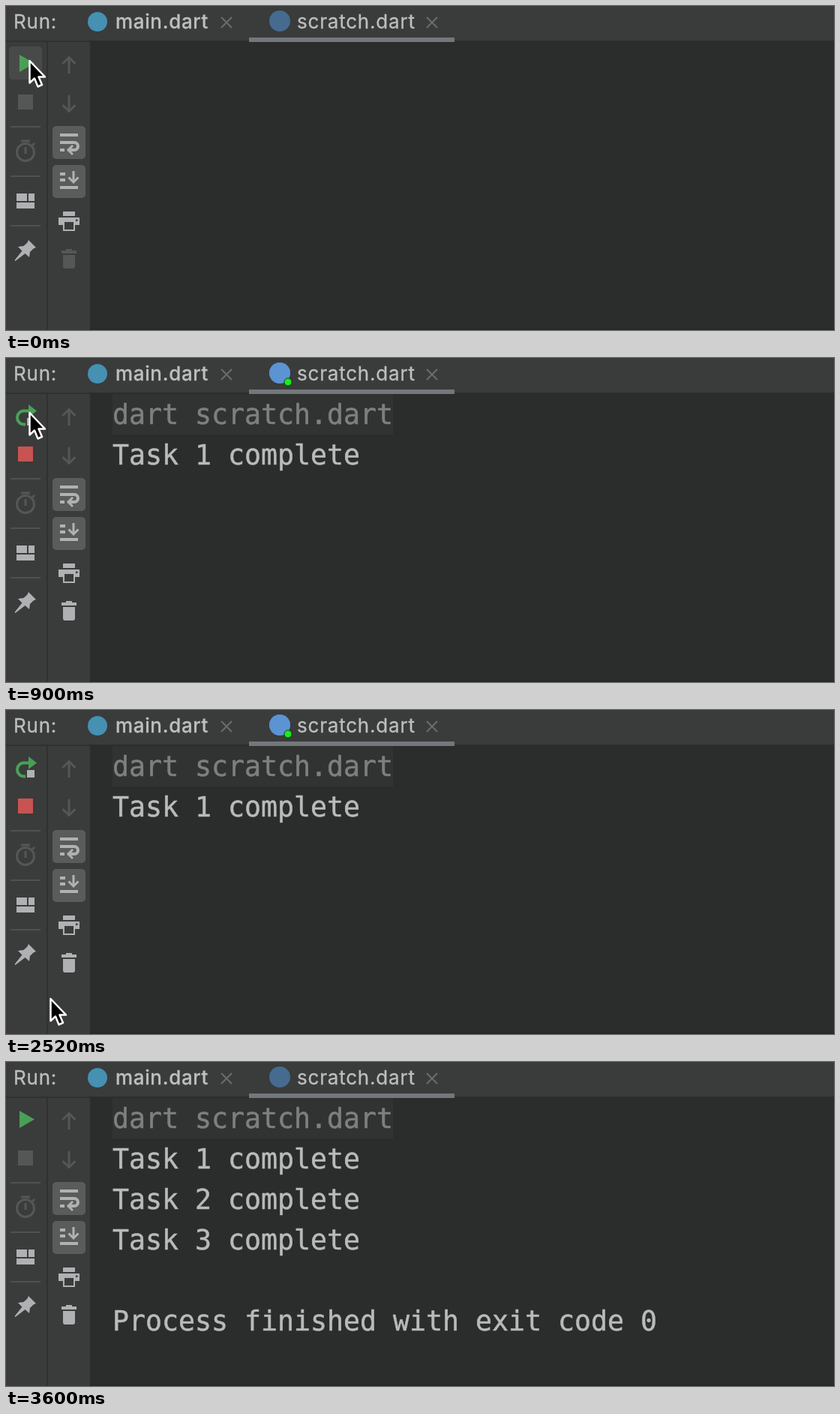
Write an HTML page that moves like this. It is 1104 px wide and 432 px high and loops after 4.44 s.

```html
<!DOCTYPE html>
<html lang="en">
<head>
<meta charset="utf-8">
<title>Run console</title>
<style>
  html, body { margin: 0; width: 100%; height: 100%; overflow: hidden; background: #2b2d2c; }
  svg { display: block; width: 100%; height: 100%; }
  .tabs text { font: 26px Inter, Roboto, sans-serif; letter-spacing: .8px; fill: #bdbfbf; stroke: #bdbfbf; stroke-width: .3; }
  .tabs .strong { font-weight: 500; letter-spacing: .65px; }
  .console text { font: 36.55px "DejaVu Sans Mono", "Liberation Mono", monospace; fill: #b9bbbb; stroke: #b9bbbb; stroke-width: .5; white-space: pre; }
  .console .command { fill: #7e807f; stroke: #7e807f; }
  .line { fill: none; stroke: currentColor; stroke-width: 3; }
  .thick { stroke-width: 4; }
  .solid { fill: currentColor; }
  .on { color: #afb1b3; }
  .off { color: #555757; }
  .go { color: #4a9f56; }
  .hover { fill: #484a4a; }
</style>
</head>
<body>
<svg viewBox="0 0 1104 432">
  <defs>
    <path id="bin" d="M80 324H88V326H94V330H74V326H80ZM76 332H92V347Q92 350 89 350H79Q76 350 76 347Z"/>
  </defs>
  <rect width="1104" height="432" fill="#2b2d2c"/>
  <rect y="430" width="1104" height="2" fill="#282a29"/>
  <rect width="112" height="432" fill="#3a3b3b"/>
  <rect y="46" width="112" height="2" fill="#303131"/>
  <rect x="54" y="48" width="2" height="384" fill="#303131"/>

  <g class="tabs">
    <rect width="1104" height="46" fill="#3a3b3b"/>
    <rect width="1104" height="46" fill="#37434b" data-on="240-360"/>
    <rect x="324" y="42" width="274" height="6" fill="#72777a"/>
    <rect x="324" y="42" width="274" height="6" fill="#438bae" data-on="240-360"/>
    <text x="10" y="30">Run:</text>
    <circle cx="122" cy="21" r="13" fill="#4590b3"/>
    <text class="strong" x="146" y="30">main.dart</text>
    <circle cx="365" cy="20" r="14" fill="#466b8f"/>
    <circle cx="365" cy="20" r="14" fill="#4a70a5" data-on="240-300"/>
    <g data-on="300-3240">
      <circle cx="365" cy="20" r="14" fill="#5b93d3"/>
      <circle cx="376" cy="32" r="5" fill="#12f312" stroke="#2c3a2c"/>
    </g>
    <text x="388" y="30">scratch.dart</text>
    <path d="M287 15l14 14m0-14l-14 14M561 15l14 14m0-14l-14 14" fill="none" stroke="#6a6d6d" stroke-width="2"/>
  </g>

  <!-- run toolbar -->
  <rect class="hover" x="4" y="54" width="44" height="44" rx="5" data-on="0-300"/>
  <rect class="hover" x="4" y="106" width="44" height="44" rx="5" id="stopHover"/>
  <path class="solid go" d="M18 65L38 76.5L18 88Z" data-on="0-300 3240-4440"/>
  <g data-on="300-3240">
    <path class="line thick go" d="M26 88.5H24A9 9 0 0 1 24 70.5H32"/>
    <path class="solid go" d="M30 62L41 70.5L30 79Z"/>
    <rect class="solid on" x="28" y="80" width="10" height="10"/>
  </g>
  <rect class="solid off" x="16" y="118" width="20" height="20"/>
  <rect x="16" y="118" width="20" height="20" fill="#c75450" data-on="300-3240"/>
  <path d="M6 161H46M6 227H46M6 293H46" stroke="#505252" stroke-width="2"/>
  <g class="line off">
    <circle cx="26" cy="195" r="11.5"/>
    <path d="M20 180H32M26 188V197M34 187L38 183"/>
  </g>
  <path class="solid on" d="M14 250h14v10H14ZM30 250h8v10H30ZM14 262h24v8H14Z"/>
  <path class="solid on" d="M30 312L40 322L36.5 323.5L32 328L31 335L25.5 330L12.5 340L11.5 339L21.5 326.5L16 321L23.5 320L28.5 315.5Z"/>

  <!-- console toolbar -->
  <path class="line off" d="M84 90V69M75.5 77L84 68.5L92.5 77M84 119V140M75.5 132L84 140.5L92.5 132"/>
  <rect x="62" y="160" width="44" height="44" rx="5" fill="#5a5c5c"/>
  <rect x="62" y="212" width="44" height="44" rx="5" fill="#5a5c5c"/>
  <g class="on">
    <path class="line thick" d="M72 172H96M72 182H91A5 5 0 0 1 91 192H84M72 192H78"/>
    <path class="line" d="M89 186L83 192L89 198"/>
    <path class="line thick" d="M72 224H79M72 232H79M72 242H96"/>
    <path class="line" d="M90 220V235M83.5 228.5L90 235L96.5 228.5"/>
    <path class="solid" d="M76 274H92V280H76Z"/>
    <path class="solid" fill-rule="evenodd" d="M70 282H98V292H92V300H76V292H70ZM78 288V298H90V288ZM93 284.5V287H95.5V284.5Z"/>
  </g>
  <use href="#bin" class="solid off"/>
  <use href="#bin" class="solid on" data-on="420-4440"/>

  <g class="console">
    <rect x="142" y="54" width="4" height="44" fill="#bbbdbd" data-on="240-420"/>
    <g data-on="420-4440">
      <rect x="142" y="48" width="374" height="54" fill="#313332"/>
      <text class="command" x="142" y="88">dart scratch.dart</text>
    </g>
    <text x="142" y="142" data-on="720-4440">Task 1 complete</text>
    <g data-on="3300-4440">
      <text x="142" y="196">Task 2 complete</text>
      <text x="142" y="250">Task 3 complete</text>
    </g>
    <text x="142" y="358" data-on="3360-4440">Process finished with exit code 0</text>
  </g>

  <path id="pointer" d="M0 0V29.5L6.5 23.5L11 34.5L16.5 32L12 21.5H20.5Z" fill="#000" stroke="#fff" stroke-width="2.5" stroke-linejoin="round"/>
</svg>
<script>
  const LOOP = 4440, TICK = 60;
  const get = id => document.getElementById(id);
  const show = (el, on) => { el.style.visibility = on ? 'visible' : 'hidden'; };

  const timed = [...document.querySelectorAll('[data-on]')].map(el => ({
    el, spans: el.dataset.on.split(' ').map(span => span.split('-').map(Number))
  }));

  // Pointer tip: rests on the run button, then glides down and leaves the stage.
  function pointerAt(t) {
    if (t < 2100) return [31.5, 73];
    if (t >= 2760) return null;
    const step = Math.floor((t - 2100) / TICK);
    if (step > 7) return [[64, 408], [66, 420], [67, 428]][step - 8];
    const p = step / 7;
    const ease = 0.6 * p + 0.4 * p * p * (3 - 2 * p);
    return [35.5 + 24 * p, 101 + 284 * ease];
  }

  function draw(t) {
    for (const { el, spans } of timed) show(el, spans.some(([a, b]) => t >= a && t < b));
    const tip = pointerAt(t);
    show(get('pointer'), tip);
    if (tip) get('pointer').setAttribute('transform', `translate(${tip})`);
    show(get('stopHover'), tip && tip[0] < 48 && tip[1] > 106 && tip[1] < 150);
  }

  const start = performance.now();
  function frame() {
    draw((performance.now() - start) % LOOP);
    requestAnimationFrame(frame);
  }
  frame();
</script>
</body>
</html>
```
